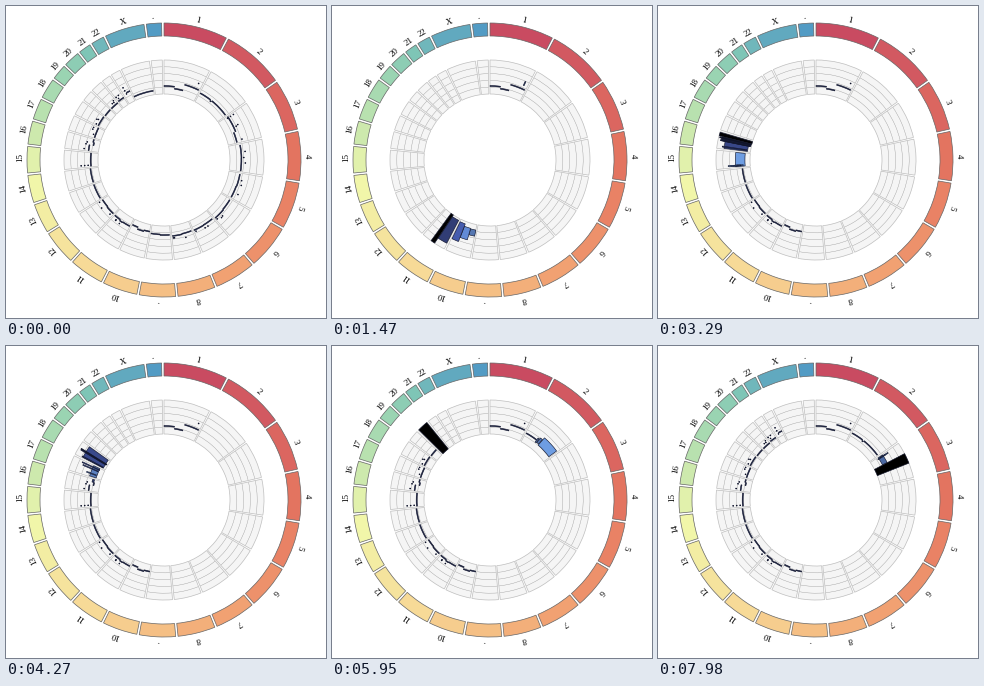
A matplotlib script that plays this animation: 320 px wide and 312 px high, repeating every 8 s.

```python
import numpy as np
import matplotlib.pyplot as plt
from matplotlib.animation import FuncAnimation
from matplotlib.colors import LinearSegmentedColormap
from matplotlib.patches import Wedge

W, H, DPI = 320, 312, 100
PX = 72 / DPI
CX, CY = 158, 154
RING = (124, 137)
TRACK = (66, 100)
LABEL_R = 141.5
LOOP, STEP = 8000, 40
SHRINK = 1000
CLEAR = 70
GAP = 1.0

NAMES = [str(i) for i in range(1, 23)] + ["X", "Y"]
# chromosome lengths in Mb
SIZES = [249, 243, 198, 191, 181, 171, 159, 146, 141, 136, 135, 134,
         115, 107, 102.5, 90, 81, 78, 59, 63, 48, 51, 155, 59]

SPECTRUM = LinearSegmentedColormap.from_list("spectrum", [
    "#c94b61", "#e67860", "#f3aa76", "#f7d996",
    "#f1f7aa", "#b1deb0", "#83c9b5", "#529bc4"])
FADE = LinearSegmentedColormap.from_list("fade", [
    "#000000", "#323e76", "#4a62ba", "#70a0e4", "#28325f"])

# stepped lines: (start as a share of the sector, radius)
STEPS = {
    "1": [(0, 74), (.31, 72), (.57, 78)],
    "2": [(.02, 76), (.37, 75), (.42, 76), (.5, 76)],
    "3": [(.02, 77), (.32, 77), (.61, 75)],
    "10": [(0, 73), (.3, 74), (.66, 72)],
    "11": [(.02, 74.5), (.44, 75), (.62, 74)],
    "16": [(.05, 76), (.5, 72), (.75, 73)],
    "22": [(.5, 77)],
    "X": [(0, 70)],
}
STACKS = {"3": .06, "15": .13, "22": .4}
BUSY = "3 4 5 6 7 8 11 12 16 17 18 20 21".split()

# place in the sorted queue -> start time in ms
PACE = [(0, 70), (1, 600), (2.43, 1430), (6.1, 2555), (7.75, 3270),
        (11.42, 5070), (12, 5900), (14.38, 6630), (15.1, 7150),
        (15.3, 7940), (24, 16000)]


def arc(r0, r1, a0, a1, **style):
    """Ring piece; angles in degrees clockwise from the top."""
    return ax.add_patch(Wedge((CX, CY), r1, a0 - 90, a1 - 90, width=r1 - r0, **style))


def add_label(text, mid):
    # every label starts half a digit before the middle of its sector
    deg = mid - np.degrees(2.2 / LABEL_R)
    turn = np.radians(deg)
    ax.text(CX + LABEL_R * np.sin(turn), CY - LABEL_R * np.cos(turn), text,
            rotation=-mid, rotation_mode="anchor", ha="left", va="baseline",
            family="Liberation Serif", fontsize=9 * PX, color="black")


fig = plt.figure(figsize=(W / DPI, H / DPI), dpi=DPI, facecolor="white")
ax = fig.add_axes([0, 0, 1, 1])
ax.set_xlim(0, W)
ax.set_ylim(H, 0)
ax.axis("off")

scale = (360 - GAP * len(NAMES)) / sum(SIZES)
sectors = {}
angle = 0
for i, (name, size) in enumerate(zip(NAMES, SIZES)):
    span = size * scale
    end = angle + span
    sectors[name] = (angle, span)
    arc(*RING, angle, end, facecolor=SPECTRUM(i / (len(NAMES) - 1)),
        edgecolor="#666666", linewidth=.7 * PX)
    arc(*TRACK, angle, end, facecolor="#f5f5f5", edgecolor="#bebebe",
        linewidth=.7 * PX)
    for r in np.linspace(*TRACK, 6)[1:-1]:
        arc(r - .01, r + .01, angle, end, facecolor="none",
            edgecolor="#c8c8c8", linewidth=.4 * PX)
    add_label("." if name in ("9", "Y") else name, angle + span / 2)
    angle = end + GAP

rng = np.random.default_rng(5)
queue = sorted(STEPS.keys() | set(NAMES) - {"Y"})
places, times = zip(*PACE)
bars = []


def add_bar(name, a, b, r):
    first, span = sectors[name]
    patch = arc(*TRACK, first + a * span, first + b * span, linewidth=.6 * PX,
                edgecolor="#10142a", zorder=3)
    bars.append((patch, r, np.interp(queue.index(name) + a, places, times)))


def add_speck(name, pos, r):
    half = .3 / sectors[name][1]
    add_bar(name, pos - half, pos + half, r)


def default_steps(name):
    """One or two pieces on a ring that bulges to the right."""
    first, span = sectors[name]
    base = 75.3 + 1.8 * np.sin(np.radians(first + span / 2))
    starts = [.05, .52] if span > 13 else [.06]
    return [(s, base + rng.uniform(-.8, .8)) for s in starts]


for name in queue:
    steps = STEPS.get(name) or default_steps(name)
    ends = [s for s, _ in steps[1:]] + [.98]
    for (a, r), b in zip(steps, ends):
        add_bar(name, a, b - .01, r)
    if name in STACKS:
        for k in range(3):
            add_speck(name, STACKS[name], 76 + 3.5 * k)
    if name in BUSY:
        for pos in rng.uniform(.1, .95, 3):
            add_speck(name, pos, steps[0][1] + rng.uniform(2, 5))
add_speck("1", .9, 84)


def update(i):
    t = i * STEP
    for patch, r, start in bars:
        u = 1 if t < CLEAR else min((t - start) / SHRINK, 1)
        patch.set_visible(u >= 0)
        if u < 0:
            continue
        inner = TRACK[0] + (r - .45 - TRACK[0]) * u
        outer = TRACK[1] + (r + .45 - TRACK[1]) * u
        patch.set_radius(outer)
        patch.set_width(outer - inner)
        patch.set_facecolor(FADE(float(u)))
    return [bar[0] for bar in bars]


anim = FuncAnimation(fig, update, frames=LOOP // STEP, interval=STEP,
                     init_func=lambda: update(0), repeat=True, repeat_delay=0)
plt.show()
```
